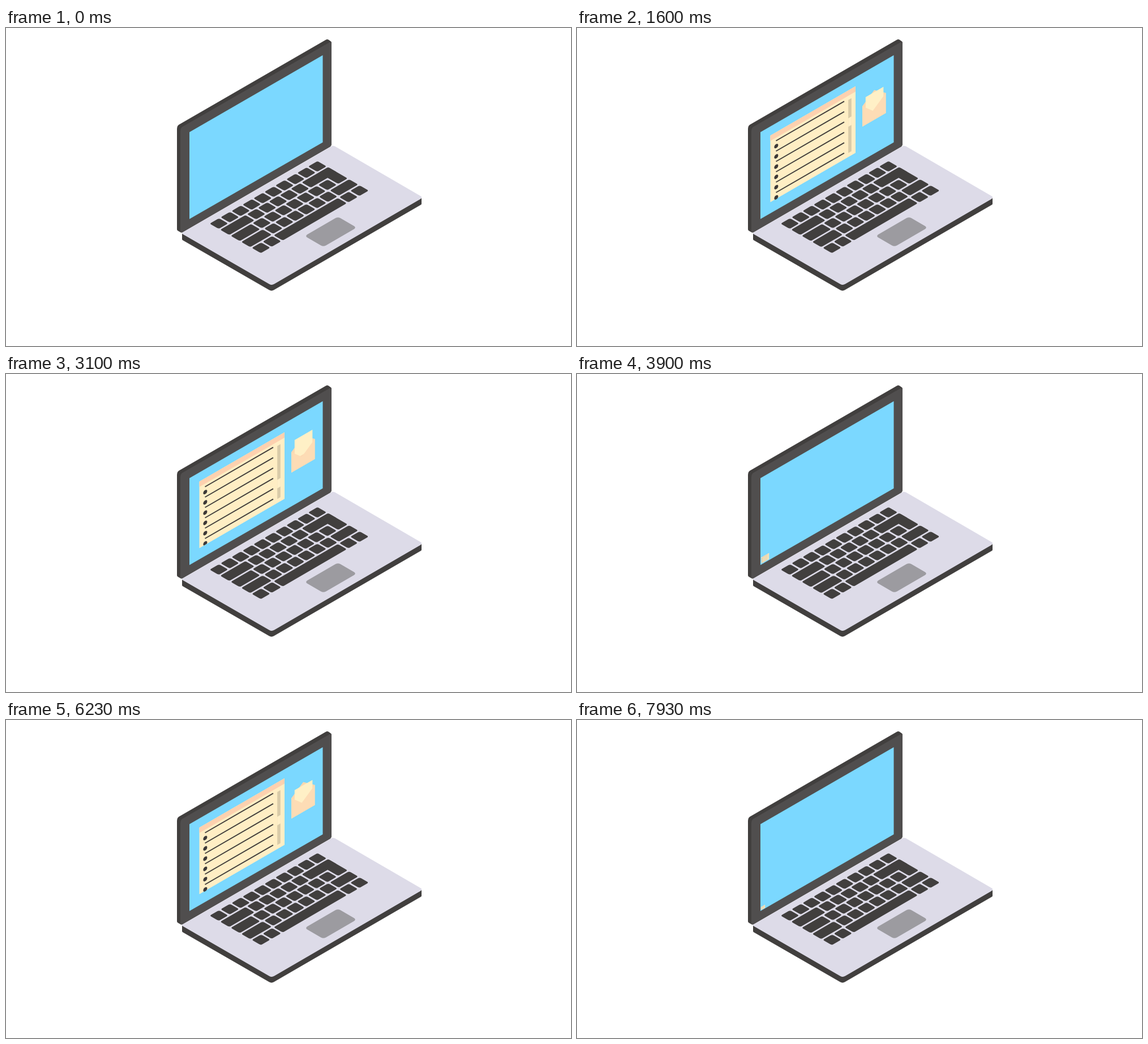
An HTML page with a canvas for the animation above (8010 ms loop, 998 by 561 pixels).

```html
<!DOCTYPE html>
<html lang="en">
<head>
<meta charset="utf-8">
<title>Laptop mail</title>
<style>
html, body { margin: 0; width: 100%; height: 100%; overflow: hidden; background: #fff; }
canvas { display: block; }
</style>
</head>
<body>
<canvas id="stage" width="998" height="561"></canvas>
<script>
const ctx = document.getElementById('stage').getContext('2d');
const SLOPE = -0.577;
const LOOP = 8010, CYCLE = 4000;
const DARK = '#413f3e', CREAM = '#ffeec4', PEACH = '#fddcb5';

function smooth(t, from, to) {
  const u = Math.min(1, Math.max(0, (t - from) / (to - from)));
  return u * u * (3 - 2 * u);
}

function fillPath(d, color) {
  ctx.fillStyle = color;
  ctx.fill(new Path2D(d));
}

function poly(points, color) {
  fillPath('M' + points.join('L') + 'Z', color);
}

// Parallelogram with upright sides, given by its top left corner
function slab(x, y, w, h, color) {
  const r = w * SLOPE;
  poly([[x, y], [x + w, y + r], [x + w, y + r + h], [x, y + h]], color);
}

function scaled(x, y, s, draw) {
  if (s < 0.005) return;
  ctx.save();
  ctx.translate(x, y);
  ctx.scale(s, s);
  ctx.translate(-x, -y);
  draw();
  ctx.restore();
}

function drawBase() {
  fillPath('M311 362L469 453L734 300V310Q734 311 733 311.7L473 462.3Q469 464.5 465 462.3L312 374.3Q311 373.7 311 372.5Z', DARK);
  fillPath('M311 361L574 209Q578 206.8 582 209.2L732 296.3Q736.5 299 732 301.8L474 451.6Q469.5 454.3 465 451.8L311 363Z', '#dddbe8');
}

// Key from column a to b, with columns centred on whole numbers
function key(row, a, b) {
  ctx.beginPath();
  ctx.roundRect(a + 0.07, row - 0.43, b - a - 0.14, 0.86, 0.15);
  ctx.fill();
}

function keys(row, from, count) {
  for (let i = 0; i < count; i++) key(row, from + i, from + i + 1);
}

function drawKeyboard() {
  ctx.save();
  ctx.transform(19.33, -11.2, 18.6, 10.7, 376, 345);
  ctx.fillStyle = DARK;
  keys(0, -0.5, 10);
  key(1, -0.5, 1.95);
  keys(1, 1.95, 5);
  key(1, 6.95, 9.5);
  ctx.beginPath();
  ctx.roundRect(8.57, 0.57, 0.86, 1.86, 0.15);
  ctx.fill();
  key(2, -0.5, 1.5);
  keys(2, 1.5, 7);
  key(3, -0.5, 1.6);
  keys(3, 1.6, 6);
  key(3, 7.6, 9.5);
  keys(4, -0.5, 2);
  key(4, 1.5, 7.5);
  keys(4, 7.5, 2);
  ctx.restore();

  ctx.save();
  ctx.transform(19.5, -11.3, 18.8, 10.9, 527.5, 367);
  ctx.fillStyle = '#9c9ba0';
  ctx.beginPath();
  ctx.roundRect(0, 0, 3.02, 1.76, 0.24);
  ctx.fill();
  ctx.restore();
}

function drawLid() {
  fillPath('M302 178Q302 172.5 305.5 170.5L565.5 20.5Q567.5 19.3 569.3 20.6L574 23.8Q575 24.6 575 26V204Q575 208 571.5 210L312 360.2Q310 361.3 308 360.2L303.3 357.5Q302 356.7 302 355Z', DARK);
  fillPath('M308 182Q308 176.3 312 174L571 25.6Q575 23.6 575 28V204Q575 208 571.5 210L312 360Q308 362 308 357.5Z', '#504e4e');
  poly([[324, 183.7], [559.5, 48], [559.5, 201.7], [324, 337]], '#7bd8ff');
}

function drawList(t, sink) {
  slab(341.5, 189.7, 150.5, 117.5, CREAM);
  slab(341.5, 189.7, 150.5, 9.5, '#fdd1af');

  ctx.strokeStyle = '#433f3c';
  ctx.lineWidth = 2;
  ctx.beginPath();
  for (let i = 0; i < 6; i++) {
    const y = 199 + i * 18.25;
    ctx.moveTo(351.5, y);
    ctx.lineTo(472, y - 69.6);
  }
  ctx.stroke();

  ctx.save();
  ctx.transform(1, SLOPE, 0, 1, 341.5, 189.7);
  ctx.beginPath();
  ctx.rect(0, 0, 150, 117.5 + 6 * sink);
  ctx.clip();
  ctx.fillStyle = '#3c3937';
  for (let i = 0; i < 6; i++) {
    ctx.beginPath();
    ctx.arc(10.4, 24.6 + i * 18.1, 3.5, 0, 7);
    ctx.fill();
  }
  ctx.restore();

  slab(479.2, 127, 5.6, 93.5, '#d9cba8');
  slab(479.2, 129.8 + t * 0.0184, 5.6, 15, '#fff0c9');
}

function drawMail(sink) {
  poly([[504, 138], [525, 109.5], [545.5, 114.5], [545.5, 150], [504, 174]], '#fcd9b0');
  slab(509.8, 116.3 + 8.7 * sink, 31.5, 34, '#fff0c6');
  poly([[504, 138], [522.5, 146], [545.5, 114.5], [545.5, 150], [504, 174]], PEACH);
}

function drawScreen(t) {
  const listSize = smooth(t, 0, 880) - smooth(t, 3440, 4005);
  const mailSize = smooth(t, 300, 860) - smooth(t, 3310, 3860);
  const half = t % 2000;
  const sink = 1 - smooth(half, 0, 1000) + smooth(half, 1000, 2000);
  ctx.save();
  ctx.clip(new Path2D('M324 183.7L559.5 48V201.7L324 337Z'));
  scaled(324, 337, listSize, () => drawList(t, sink));
  scaled(524.5, 140, mailSize, () => drawMail(sink));
  ctx.restore();
}

// Pictures change at 0 and 30 ms of every tenth of a second
function hold(t) {
  const rest = t % 100;
  return Math.min(7930, t - rest + (rest >= 30 ? 30 : 0));
}

const start = performance.now();

function frame() {
  const t = hold((performance.now() - start) % LOOP);
  ctx.fillStyle = '#fff';
  ctx.fillRect(0, 0, 998, 561);
  drawBase();
  drawKeyboard();
  drawLid();
  drawScreen(t % CYCLE);
  requestAnimationFrame(frame);
}
frame();
</script>
</body>
</html>
```
